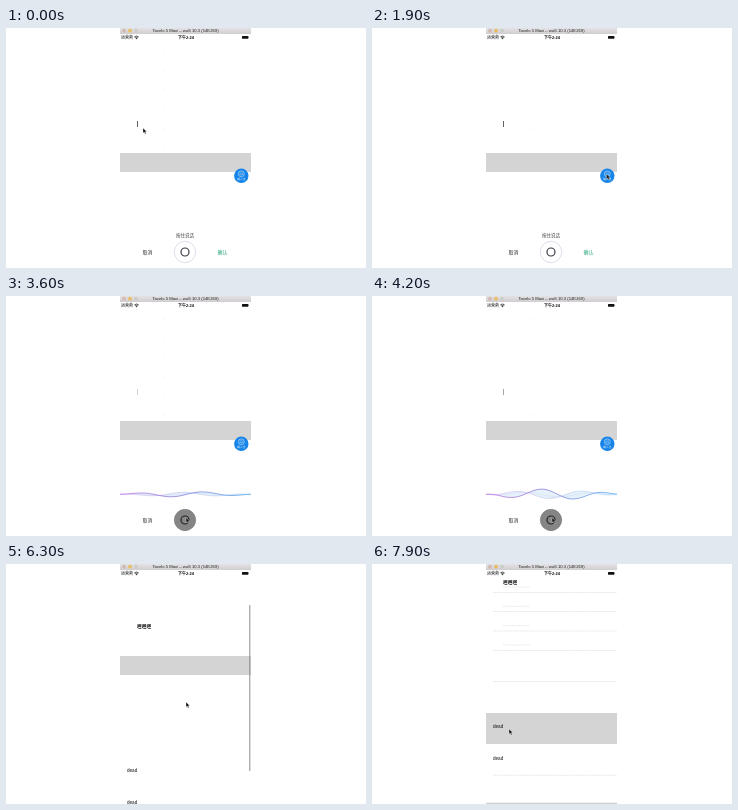
Animation of 360 by 240 pixels, one loop 8000 ms. Source, as an HTML page:

```html
<!DOCTYPE html>
<html lang="zh">
<head>
<meta charset="utf-8">
<style>
html, body { margin: 0; width: 100%; height: 100%; overflow: hidden; background: #fff; }
svg { display: block; width: 360px; height: 240px; }
text { font-family: "Liberation Sans", "Noto Sans CJK SC", "Noto Sans CJK", sans-serif; }
</style>
</head>
<body>
<svg id="stage" viewBox="0 0 360 240">
  <defs>
    <clipPath id="window"><rect x="114" y="0" width="131" height="240"/></clipPath>
    <linearGradient id="bar" x1="0" y1="0" x2="0" y2="1">
      <stop stop-color="#e4e2e4"/><stop offset="1" stop-color="#cfcdcf"/>
    </linearGradient>
    <linearGradient id="hue" gradientUnits="userSpaceOnUse" x1="114" x2="245" y1="0" y2="0">
      <stop stop-color="#b565dc"/><stop offset=".45" stop-color="#7668d2"/><stop offset="1" stop-color="#4aa9ee"/>
    </linearGradient>
  </defs>
</svg>
<script>
const LOOP = 8000;
const stage = document.getElementById('stage');

function add(parent, tag, attrs = {}) {
  const el = document.createElementNS('http://www.w3.org/2000/svg', tag);
  set(el, attrs);
  parent.appendChild(el);
  return el;
}
function set(el, attrs) {
  for (const k in attrs) el.setAttribute(k, attrs[k]);
}
const group = (parent, attrs) => add(parent, 'g', attrs);
const rect = (p, x, y, width, height, fill, rx = 0) => add(p, 'rect', { x, y, width, height, fill, rx });
const circle = (p, cx, cy, r, attrs) => add(p, 'circle', { cx, cy, r, ...attrs });
const path = (p, d, stroke, width = .6) =>
  add(p, 'path', { d, fill: 'none', stroke, 'stroke-width': width, 'stroke-linecap': 'round' });
function label(p, str, x, y, size, fill = '#222', anchor = 'middle', weight = 400) {
  const el = add(p, 'text', { x, y: y + size * .36, fill, 'font-size': size, 'text-anchor': anchor, 'font-weight': weight });
  el.textContent = str;
  return el;
}
const show = (el, on) => el.setAttribute('display', on ? 'inline' : 'none');
const ease = u => u * u * (3 - 2 * u);

// Eased interpolation through [time, value, value...] stops.
function at(stops, t) {
  if (t <= stops[0][0]) return stops[0].slice(1);
  for (let i = 1; i < stops.length; i++) {
    const a = stops[i - 1], b = stops[i];
    if (t <= b[0]) {
      const u = ease((t - a[0]) / (b[0] - a[0]));
      return a.slice(1).map((v, j) => v + (b[j + 1] - v) * u);
    }
  }
  return stops[stops.length - 1].slice(1);
}

const root = group(stage, { 'clip-path': 'url(#window)' });

// List
const list = group(root);
const fieldRow = rect(list, 114, 125, 131, 19, '#d4d4d4');
const deadRow = rect(list, 114, 226, 131, 31, '#d4d4d4');
const rules = group(list);
const dashed = (x1, x2, y) => set(path(rules, `M${x1} ${y}H${x2}`, '#cfcfcf', .5), { 'stroke-dasharray': '1.2 .6', 'stroke-linecap': 'butt' });
[105.5, 124.5, 144, 163.5, 194.5, 288.3].forEach(y => dashed(121, 245, y));
path(rules, 'M114 316.3H245', '#aaa', .7);
const dots = group(list);
for (let i = 0; i < 8; i++) {
  const y = 100 + (i - 4) * 19.3;
  rect(dots, 158, y, .6, .6, '#ccc');
  if (i > 3) dashed(131, 158, y);
}
const spoken = label(list, '嗯嗯嗯', 131, 95.6, 4.7, '#111', 'start', 700);
label(list, 'dead', 121, 239.8, 4.6, '#111', 'start');
label(list, 'dead', 121, 271.2, 4.6, '#111', 'start');
const caret = rect(root, 131, 93, .8, 6, '#222');
const scrollbar = rect(root, 243.3, 16, 1, 166, '#8c8c8c', .5);

// Window title and status bar
rect(root, 114, 0, 131, 6, 'url(#bar)');
['#d3b9b2', '#e8bd62', '#cbcdc8'].forEach((fill, i) => circle(root, 118 + i * 6, 2.7, 1.9, { fill }));
label(root, 'Tavelo 5 Maxi – wuS 10.3 (14E269)', 179.5, 2.8, 4.2, '#222');
label(root, '运营商', 115, 9.4, 4, '#111', 'start');
path(root, 'M128.6 8.7Q130.5 7 132.4 8.7M129.4 9.7Q130.5 8.8 131.6 9.7', '#111', .7);
circle(root, 130.5, 10.6, .55, { fill: '#111' });
label(root, '下午2:24', 180, 9.4, 4, '#111', 'middle', 700);
rect(root, 236, 7.9, 6.2, 2.8, '#111', .5);
rect(root, 242.5, 8.7, .5, 1.2, '#111');

// Voice panel
const panel = group(root);
rect(panel, 114, 153, 131, 87, '#fff');
label(panel, '取消', 141.5, 223.9, 5, '#333');
const idle = group(panel);
label(idle, '按住说话', 179, 207, 4.5, '#444');
label(idle, '确认', 216.5, 224.1, 5, '#28a579');
const micBase = circle(panel, 179, 224, 10.7, { 'stroke-width': .6 });
const micCore = circle(panel, 179, 224, 4, { fill: 'none', 'stroke-width': 1.2 });
const waves = group(panel);
const fill = add(waves, 'path', { fill: '#84bdea', opacity: .2 });
const WAVES = [
  { crest: 143, length: 68, gain: .78, opacity: .45, width: .5, speed: .0052 },
  { crest: 151, length: 72, gain: .5, opacity: .25, width: .4, speed: .0047 },
  { crest: 169, length: 66, gain: 1, opacity: .9, width: .75, speed: .006 }
];
WAVES.forEach(w => {
  w.el = path(waves, '', 'url(#hue)', w.width);
  w.el.setAttribute('opacity', w.opacity);
});

function wavePoints(w, amp, t) {
  const points = [];
  for (let x = 114; x <= 246; x += 2) {
    const u = (x - 179.5) / 66;
    const env = Math.max(.08, 1 - u * u);
    const y = 198.3 - amp * w.gain * env * Math.cos((x - w.crest) / w.length * 2 * Math.PI - (t - 4200) * w.speed);
    points.push(x + ' ' + y.toFixed(2));
  }
  return points;
}

// Keyboard
const keys = group(root);
rect(keys, 114, 153.7, 131, 87, '#d1d5db');
rect(keys, 114, 153.7, 131, 14.3, '#b0b7c2');
path(keys, 'M157.5 156V165M201.5 156V165', '#cbd0d7', .5);
['I', 'Odu', 'dwo'].forEach((s, i) => label(keys, s, 135.5 + i * 44, 160.5, 5, '#f7f8fa'));
function key(x, y, w, special) {
  rect(keys, x, y + .6, w, 13, '#9a9fa8', 1.6);
  rect(keys, x, y, w, 13, special ? '#a6aebb' : '#fff', 1.6);
}
['qwertyuiop', 'asdfghjkl', 'zxcvbnm'].forEach((row, r) => {
  const first = [120.5, 127, 140][r], y = 170.9 + r * 18;
  [...row].forEach((c, i) => {
    const x = first + i * 13.05;
    key(x - 5.3, y, 10.6);
    label(keys, c, x, y + 6.2, 8, '#111');
  });
});
key(115.2, 206.9, 13.6, true);
key(230, 206.9, 13.6, true);
path(keys, 'M119 213.6L122 210.3L125 213.6H123.4V216.3H120.6V213.6Z', '#222', .8);
path(keys, 'M233 213.3L235.3 210.8H240.5V215.8H235.3ZM236.8 212.1L239 214.5M239 212.1L236.8 214.5', '#222', .6);
[[115.2, 14, 1], [131.6, 13.4, 1], [147.7, 10.6, 0], [160.6, 50.4, 0], [213, 30.6, 1]].forEach(([x, w, s]) => key(x, 224.4, w, s));
label(keys, '123', 122.2, 231, 5.2, '#111');
label(keys, 'space', 185.8, 230.6, 5.4, '#111');
label(keys, 'return', 228.3, 230.6, 5.4, '#111');
circle(keys, 138.3, 231, 3, { fill: 'none', stroke: '#222', 'stroke-width': .7 });
path(keys, 'M135.3 231H141.3M138.3 228V234M138.3 228Q135.5 231 138.3 234M138.3 228Q141.1 231 138.3 234', '#222', .5);
function micIcon(p, x, y, color) {
  rect(p, x - 1.1, y - 3.4, 2.2, 4.3, color, 1.1);
  path(p, `M${x - 2} ${y - .6}Q${x - 2} ${y + 1.8} ${x} ${y + 1.8}T${x + 2} ${y - .6}M${x} ${y + 1.8}V${y + 3.2}M${x - 1.3} ${y + 3.2}H${x + 1.3}`, color);
}
micIcon(keys, 153, 231, '#222');

// Floating input switch, drawn around its own centre
const toggle = group(root);
const disc = circle(toggle, 0, 0, 7.2);
const face = group(toggle);
circle(face, 0, -2, 2.9, { fill: 'none', stroke: '#d5eaff', 'stroke-width': .6 });
path(face, 'M-1.3 -2.7H1.3M-1.3 -1.2Q0 -.1 1.3 -1.2', '#d5eaff', .5);
label(face, '输入法', 0, 3.3, 2.7, '#fff');
const redFace = group(toggle);
micIcon(redFace, 0, -2.2, '#ffe0a8');
label(redFace, '语音', 0, 3.3, 2.7, '#fff');

// Pointer
const ring = circle(stage, 0, 0, 6.4, { fill: 'none', stroke: '#111', 'stroke-width': 1.4 });
const arrow = add(stage, 'path', {
  d: 'M0 0V5.2L1.2 4.1L2.1 6.1L3.1 5.7L2.2 3.7H3.8Z', fill: '#111', stroke: '#fff', 'stroke-width': .35
});

const POINTER = [
  [0, 137, 100], [250, 137, 100], [850, 234.5, 146], [1900, 234.5, 146], [2450, 182, 221.5], [2900, 182, 221.5],
  [3500, 180, 221.5], [4700, 180, 221.5], [5200, 216, 224], [5550, 216, 224], [5900, 180, 171], [6200, 180, 138],
  [6330, 180, 138], [6480, 180, 192], [6800, 180, 152], [6900, 180, 151], [7400, 137, 165]
];
const SCROLL = [[5930, 0], [6300, 33], [6480, 40], [6800, 82.5], [6870, 83], [7150, 77]];
const LOUDNESS = [[2450, .4], [2900, .7], [3300, 3.8], [3700, 2.4], [4200, 5.3], [4650, .5]];
const PRESSES = [[820, 980], [1680, 1830], [2500, 3000], [5380, 5500], [5920, 6220], [6490, 6860], [7480, 7620]];
const within = (t, a, b) => t >= a && t < b;

function render(t) {
  const typing = within(t, 980, 1760);
  const talking = within(t, 2500, 4650);
  const confirmed = t >= 5450;
  const [scroll] = at(SCROLL, t);
  const [drop] = at([[5450, 0], [5750, 120]], t);
  const [x, y] = at(POINTER, t);

  set(list, { transform: `translate(0 ${-scroll})` });
  show(fieldRow, t < 7550);
  show(deadRow, t >= 7550);
  show(spoken, confirmed);
  show(dots, t < 6300);
  set(rules, { opacity: at([[6950, 0], [7200, 1]], t)[0] });

  show(caret, !confirmed);
  set(caret, { opacity: .5 + .4 * Math.cos((t - 950) / 1000 * 2 * Math.PI) });

  const top = 16 + .755 * scroll;
  set(scrollbar, {
    y: top, height: Math.min(166, 238.5 - top),
    opacity: at([[5900, 0], [6000, 1], [7200, 1], [7500, 0]], t)[0]
  });

  show(panel, !typing && t < 5750);
  set(panel, { transform: `translate(0 ${drop})` });
  show(idle, !talking);
  show(keys, typing);
  show(waves, talking);
  set(micBase, talking ? { fill: '#858585', stroke: '#777' } : { fill: '#fff', stroke: '#c9c6dc' });
  set(micCore, { stroke: talking ? '#222' : '#393943' });

  if (talking) {
    const [amp] = at(LOUDNESS, t);
    const lines = WAVES.map(w => wavePoints(w, amp, t));
    WAVES.forEach((w, i) => set(w.el, { d: 'M' + lines[i].join('L') }));
    set(fill, { d: 'M' + lines[0].concat(lines[2].reverse()).join('L') + 'Z' });
  }

  show(toggle, t < 5750);
  set(toggle, { transform: `translate(235.3 ${(typing ? 144 : 147.8) + drop})` });
  set(disc, { fill: typing ? '#f0503c' : '#1684e8' });
  show(face, !typing);
  show(redFace, typing);

  set(arrow, { transform: `translate(${x} ${y})` });
  set(ring, { cx: x, cy: y });
  show(ring, PRESSES.some(([a, b]) => within(t, a, b)));
}

function frame(now) {
  render(now % LOOP);
  requestAnimationFrame(frame);
}
render(0);
requestAnimationFrame(frame);
</script>
</body>
</html>
```
